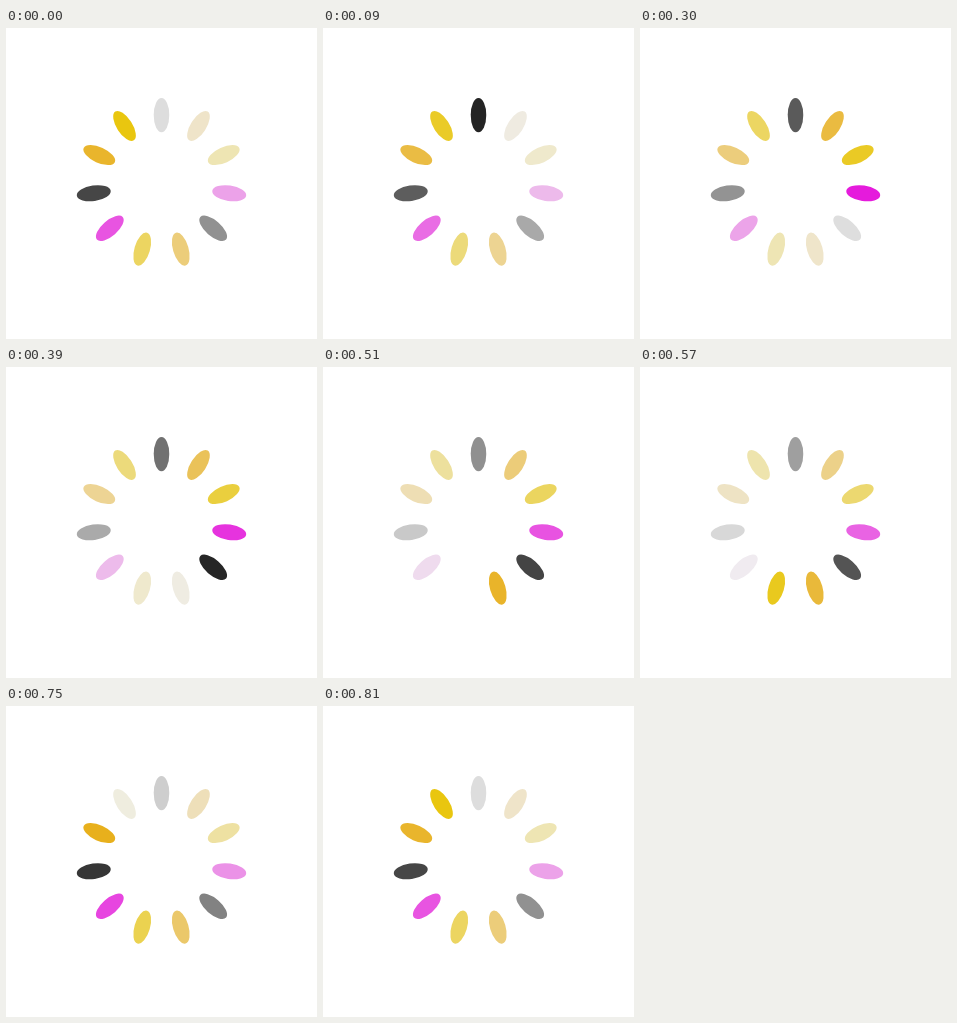
Write an HTML page that moves like this. It is 311 by 311 pixels and loops after 0.84 s.

```html
<!DOCTYPE html>
<html lang="en">
<head>
<meta charset="utf-8">
<title>Spinner</title>
<style>
  html, body { margin: 0; width: 100%; height: 100%; overflow: hidden; background: #fff; }
  svg { display: block; width: 311px; height: 311px; }
</style>
</head>
<body>
<svg viewBox="0 0 100 100"></svg>
<script>
  const COUNT = 11, STEP = 30, TURN = 27, LOOP = 840;
  const COLORS = [[32, 32, 32], [232, 175, 24], [233, 198, 15], [229, 26, 220]];
  const FADED = 240;

  const svg = document.querySelector('svg');
  const petals = Array.from({ length: COUNT }, (_, i) => {
    const el = document.createElementNS('http://www.w3.org/2000/svg', 'ellipse');
    const attrs = { cx: 50, cy: 28, rx: 2.5, ry: 5.5, transform: `rotate(${i * 360 / COUNT} 50 50)` };
    for (const name in attrs) el.setAttribute(name, attrs[name]);
    svg.append(el);
    return el;
  });

  function draw(ms) {
    const step = Math.floor((ms % LOOP) / STEP) % TURN;
    petals.forEach((el, i) => {
      // Whole-number phase avoids rounding trouble at the wrap
      const units = COUNT * TURN;
      const age = (TURN * (COUNT - 1 - i) + COUNT * step) % units / units;
      const rgb = COLORS[i % 4].map(c => Math.round(c + (FADED - c) * age));
      el.setAttribute('fill', `rgb(${rgb})`);
      // The last one percent of the fade drops out completely
      el.setAttribute('visibility', age > 0.99 ? 'hidden' : 'visible');
    });
  }

  const start = performance.now();
  function tick() {
    draw(performance.now() - start);
    requestAnimationFrame(tick);
  }
  tick();
</script>
</body>
</html>
```
